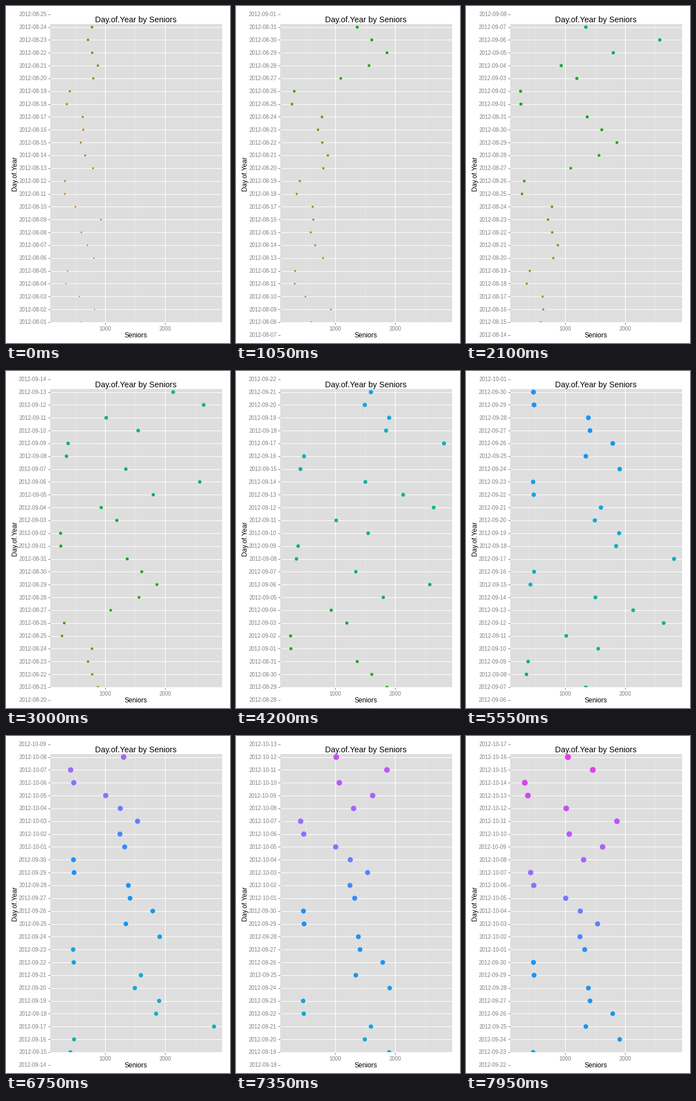
A matplotlib script for the animation above (8 s loop, 400 by 600 pixels).

```python
import numpy as np
import matplotlib.pyplot as plt
from matplotlib.animation import FuncAnimation
from matplotlib.colors import LinearSegmentedColormap
from matplotlib.patches import Rectangle

plt.rcParams["font.family"] = "Liberation Sans"

W, H, DPI = 400, 600, 100
PX = 72 / DPI                      # points per pixel
LEFT, RIGHT, TOP, BOTTOM = 79, 385.5, 32, 563
ROW_TOP, ROW_STEP, ROWS = 14.7, 22.845, 26
FIRST_TOP_DAY = 24                 # day on the top row at the start
TICK_MS, STEP_MS, LOOP_MS = 50, 150, 8000
GREY = "#7f7f7f"

# daily counts, starting on 1 August 2012
SENIORS = np.array([
    595, 820, 567, 343, 371, 810, 703, 600, 927, 502, 324, 329, 796, 665,
    591, 633, 623, 357, 408, 801, 876, 782, 712, 778, 278, 315, 1091, 1563,
    1862, 1609, 1366,
    259, 254, 1193, 932, 1801, 2577, 1343, 352, 380, 1549, 1016, 2642, 2133,
    1502, 418, 479, 2815, 1848, 1899, 1493, 1595, 474, 464, 1908, 1343, 1792,
    1413, 1385, 479, 469,
    1324, 1245, 1539, 1250, 1007, 474, 422, 1306, 1623, 1067, 1862, 1016,
    376, 324, 1460, 1044])
DAYS = np.arange(len(SENIORS))

HUES = [(0, "#e8622a"), (4, "#e56e1e"), (8, "#d27800"), (12, "#b98700"),
        (17, "#a88b00"), (20, "#7d9b00"), (23, "#6b9e00"), (25, "#3fa500"),
        (30, "#0faa12"), (36, "#10b060"), (40, "#12b37e"), (43, "#12b39a"),
        (47, "#12b0c0"), (51, "#12a8dc"), (55, "#1499f0"), (60, "#1e90ff"),
        (62, "#4a86ff"), (65, "#7a78ff"), (68, "#a566fa"), (72, "#c84ff5"),
        (76, "#e63de6")]
day_cmap = LinearSegmentedColormap.from_list(
    "days", [(day / DAYS[-1], color) for day, color in HUES], N=len(DAYS))
COLORS = day_cmap(DAYS / DAYS[-1])
RADII = 1.0 + 0.057 * DAYS
SIZES = (2 * RADII * PX) ** 2


def x_pos(value):
    return 70.3 + 0.107 * value


def row_y(row):
    return ROW_TOP + ROW_STEP * row


def date_label(day):
    if day < 0:
        return ""
    for month, length in ((8, 31), (9, 30), (10, 31)):
        if day < length:
            return f"2012-{month:02d}-{day + 1:02d}"
        day -= length


fig = plt.figure(figsize=(W / DPI, H / DPI), dpi=DPI, facecolor="white")
ax = fig.add_axes([0, 0, 1, 1])
ax.set(xlim=(0, W), ylim=(H, 0))
ax.axis("off")


def line(xs, ys, color, width=1.0, z=1):
    return ax.plot(xs, ys, color=color, lw=width * PX, zorder=z,
                   solid_capstyle="butt")[0]


def text(x, y, string, size, color="black", **kwargs):
    kwargs = {"ha": "center", "va": "baseline", "zorder": 5, **kwargs}
    return ax.text(x, y, string, fontsize=size * PX, color=color, **kwargs)


panel = ax.add_patch(Rectangle((LEFT, TOP), RIGHT - LEFT, BOTTOM - TOP,
                               fc="#dedede", ec="none", zorder=0))
for value in (500, 1500, 2500):
    line([x_pos(value)] * 2, [TOP, BOTTOM], "#e6e6e6")
for value in (1000, 2000):
    x = x_pos(value)
    line([x, x], [TOP, BOTTOM], "white", 1.1, 2)
    line([x, x], [BOTTOM, BOTTOM + 4], GREY)
    text(x, 578, str(value), 9.6, GREY)

labels, ticks = [], []
for row in range(ROWS):
    y = row_y(row)
    if TOP < y < BOTTOM + 1:
        line([LEFT, RIGHT], [y, y], "white", 1.1, 2)
    ticks.append(line([LEFT - 4, LEFT], [y, y], GREY))
    labels.append(text(72.6, y + 3.5, "", 9.6, GREY, ha="right"))

text(232.2, 29, "Day.of.Year by Seniors", 14.4)
text(232.2, 590, "Seniors", 12)
text(19.5, 298, "Day.of.Year", 12, rotation=90, va="center", ha="right",
     rotation_mode="default").set_x(22)

dots = ax.scatter(x_pos(SENIORS), np.zeros(len(DAYS)), s=SIZES, c=COLORS,
                  linewidths=0, zorder=3)
dots.set_clip_path(panel)


def update(frame):
    top_day = FIRST_TOP_DAY + frame * TICK_MS // STEP_MS
    for row, (label, tick) in enumerate(zip(labels, ticks)):
        day = top_day - row
        label.set_text(date_label(day))
        tick.set_visible(day >= 0)
    dots.set_offsets(np.column_stack([x_pos(SENIORS), row_y(top_day - DAYS)]))
    return [dots, *labels, *ticks]


anim = FuncAnimation(fig, update, frames=LOOP_MS // TICK_MS,
                     interval=TICK_MS, repeat=True, repeat_delay=0)
plt.show()
```
